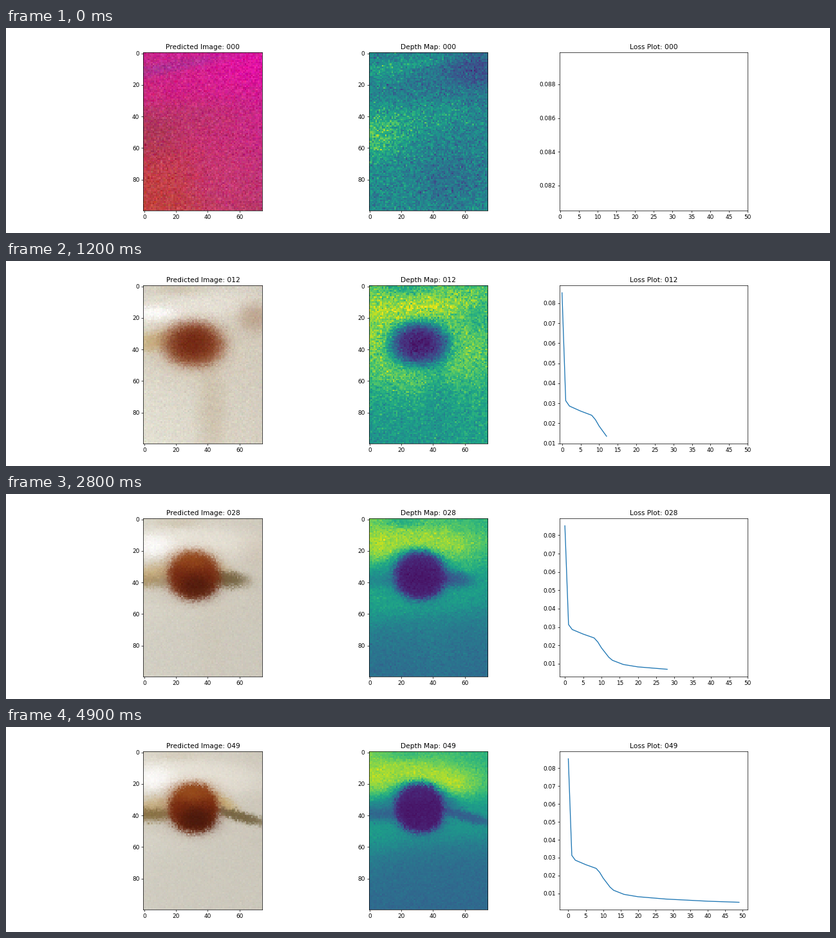
Recreate the animation shown at these times as a matplotlib script. Size 1280 by 320 pixels, loop 5 s.

```python
import numpy as np
import matplotlib.pyplot as plt
from matplotlib.animation import FuncAnimation
from matplotlib.colors import to_rgb

EPOCHS = 50
ROWS, COLS = 100, 75
GRID_Y, GRID_X = np.mgrid[0:ROWS, 0:COLS].astype(float)

# Training loss: a few key points, straight in between.
KEY_EPOCH = [0, 1, 2, 5, 8, 9, 10, 12, 13, 16, 20, 28, 40, 49]
KEY_LOSS = [85.2, 31.3, 28.6, 26.1, 24, 21.8, 18.6, 13.5, 11.8, 9.5, 8.2, 6.9,
            5.7, 5.1]
LOSS = np.interp(np.arange(EPOCHS), KEY_EPOCH, KEY_LOSS) / 1000


def lerp(a, b, t):
    return a + (b - a) * t


def learned(n, first, last):
    """Share of the loss drop between two epochs that is done at epoch n."""
    done = (LOSS[first] - LOSS[n]) / (LOSS[first] - LOSS[last])
    return np.clip(done, 0, 1)


def tone(colour, depth):
    """A surface value: red, green, blue and depth."""
    return np.array([*to_rgb(colour), depth])


class Canvas:
    def __init__(self, x, y, tl, tr, bl, br):
        self.x, self.y = x, y
        u, v = x[..., None] / COLS, y[..., None] / ROWS
        self.img = lerp(lerp(tl, tr, u), lerp(bl, br, u), v)

    def dab(self, value, alpha, cx, cy, rx, ry, soft=.3, tilt=0):
        """Blend in an ellipse with a soft edge."""
        a = np.radians(tilt)
        dx, dy = self.x - cx, self.y - cy
        r = np.hypot((dx * np.cos(a) + dy * np.sin(a)) / rx,
                     (dy * np.cos(a) - dx * np.sin(a)) / ry)
        mask = alpha / (1 + np.exp(np.clip((r - 1) / soft, -50, 50)))
        self.img += (value - self.img) * mask[..., None]


def untrained(x, y):
    c = Canvas(x, y, tone("#c8268c", .47), tone("#dc18a0", .4),
               tone("#c04440", .5), tone("#b83a6c", .47))
    c.dab(tone("#a83a58", .76), .8, 4, 51, 17, 14)
    c.dab(tone("#c2423c", .46), .6, 12, 85, 22, 18)
    c.dab(tone("#c83878", .34), .7, 50, 82, 18, 18)
    c.dab(tone("#b43868", .62), .5, 34, 40, 24, 9)
    c.dab(tone("#d81c8c", .38), .6, 38, 21, 36, 8, tilt=-8)
    c.dab(tone("#e410a4", .2), .8, 68, 11, 18, 9)
    c.dab(tone("#a0389a", .64), .6, 14, 9, 32, 3, tilt=-10)
    return c.img


def blurred(x, y):
    c = Canvas(x, y, tone("#a8986a", .54), tone("#d8b0a0", .4),
               tone("#b8a898", .38), tone("#a89c84", .42))
    c.dab(tone("#c8b4ac", .22), .85, 30, 93, 30, 15)
    c.dab(tone("#94814a", .62), .85, 35, 46, 48, 24, .2)
    c.dab(tone("#765e14", .76), .85, 37, 38, 27, 13)
    c.dab(tone("#d8a888", .28), .9, 30, 15, 60, 6, tilt=-9)
    c.dab(tone("#e4b0a8", .2), .7, 70, 8, 16, 6, tilt=-9)
    return c.img


def ball_scene(x, y, s):
    """Ball on a table; s sharpens it and lets the side shadows grow."""
    grow = s ** 4
    c = Canvas(x, y, tone("#d9d5c8", .78), tone("#cdc7ba", .64),
               lerp(tone("#e4e1d4", .5), tone("#d6d3c8", .34), s),
               lerp(tone("#d6cfc0", .57), tone("#c8c3b6", .33), s))
    # Table and backdrop.
    c.dab(tone("#cdc9bd", .34), .75 * s, 48, 86, 65, 28, .15)
    c.dab(tone("#d6cdbc", .84), .8 * (1 - s), 33, 40, 42, 23, .2)
    c.dab(tone("#c6b69e", .5), .6 * (1 - s), 43, 78, 8, 26)
    c.dab(tone("#eae5da", .88), .9, 30, 14, 40, 9, .3, lerp(-8, 4, s))
    c.dab(tone("#ffffff", .88), .9, 6, 17, 12, lerp(4, 7, s))
    c.dab(tone("#c6b89e", .5), .65 - .3 * grow, 22, 2, 11, 2.5, .4)
    c.dab(tone("#b89c84", .64), .8 * (1 - s), 70, 20, 9, 8)
    c.dab(tone("#e2ddd2", .96), .7 * grow, 48, 20, 15, 5, .4, 10)
    c.dab(tone("#cfcabd", .54), .7 * s, 28, 47, 42, 6)
    # Shadows left and right of the ball.
    c.dab(tone("#c8ac78", lerp(.84, .42, s)), .8, 5, 35, 16, 5.5, .25, -12)
    c.dab(tone("#7a6232", .3), .2 * s + .65 * grow, 5, 39.5, 16, 3.5)
    c.dab(tone("#cbae6c", .4), .8 * grow, 50, 32, 9, 3.5, tilt=35)
    c.dab(tone("#6e5c38", .28), .9 * min(1, 1.5 * s), 47 + 13 * grow,
          36.5 + 4 * grow, 10 + 7 * grow, 6 - 3 * grow, .2, 16 * grow)
    # The ball, lit from above.
    c.dab(lerp(tone("#9a5a36", .3), tone("#80320f", .1), s), 1, 31.5,
          lerp(37, 35.5, s), lerp(18.5, 15.3, s), lerp(13.5, 15.3, s * s),
          lerp(.15, .06, s))
    c.dab(tone("#702410", .05), .9, 31, 36, 13, 10, .25)
    c.dab(tone("#a05420", .1), .75 * s, 30, 25.5, 11, 5.5)
    c.dab(tone("#44170c", .07), .85 * s, 33.5, 43, 10.5, 7, .25)
    return c.img


def views(n):
    rng = np.random.default_rng(n)
    x = GRID_X + rng.normal(0, .6, GRID_X.shape)
    y = GRID_Y + rng.normal(0, .6, GRID_Y.shape)
    haze, shape, detail = learned(n, 0, 7), learned(n, 7, 12), learned(n, 12, 49)
    img = lerp(untrained(x, y), blurred(x, y), haze)
    img = lerp(img, ball_scene(x, y, detail), shape)
    rgb, depth = img[..., :3], img[..., 3]

    grain = lerp(.028, lerp(.012, .006, detail), shape)
    rgb = rgb + rng.normal(0, grain, rgb.shape)
    rgb += rng.normal(0, grain, depth.shape)[..., None]
    speckle = lerp(.075, lerp(.05, .018, detail), shape)
    depth = depth + rng.normal(0, speckle, depth.shape) * (.5 + depth)
    return np.clip(rgb, 0, 1), np.clip(depth, 0, 1)


fig, (ax_rgb, ax_depth, ax_loss) = plt.subplots(1, 3, figsize=(20, 5), dpi=64)
first_rgb, first_depth = views(0)
im_rgb = ax_rgb.imshow(first_rgb, interpolation="nearest")
im_depth = ax_depth.imshow(first_depth, interpolation="nearest",
                           cmap="viridis", vmin=0, vmax=1)


def update(n):
    rgb, depth = views(n)
    im_rgb.set_data(rgb)
    im_depth.set_data(depth)
    ax_rgb.set_title(f"Predicted Image: {n:03d}")
    ax_depth.set_title(f"Depth Map: {n:03d}")
    ax_loss.clear()
    ax_loss.plot(LOSS[:n + 1])
    ax_loss.set_xticks(np.arange(0, EPOCHS + 1, 5))
    ax_loss.set_title(f"Loss Plot: {n:03d}")


anim = FuncAnimation(fig, update, frames=EPOCHS, interval=100, repeat=True,
                     repeat_delay=0)
plt.show()
```
